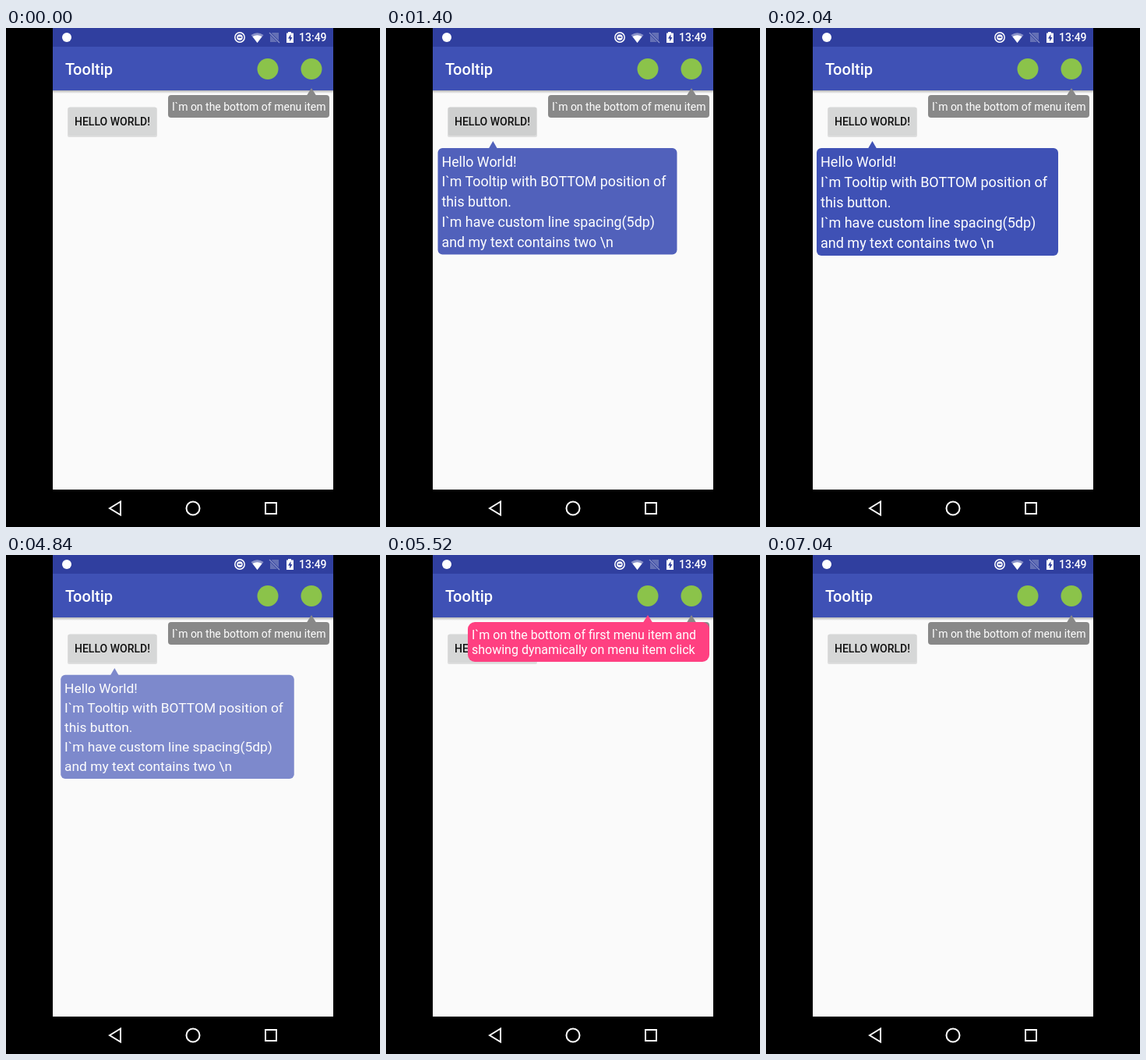
An HTML page that plays this animation: 480 by 640 pixels, repeating every 8 s.

```html
<!DOCTYPE html>
<html lang="en">
<head>
<meta charset="utf-8">
<title>Tooltip</title>
<style>
  html, body { margin: 0; width: 100%; height: 100%; overflow: hidden; background: #000; }
  svg { display: block; width: 480px; height: 640px; font: 14px Roboto, sans-serif; fill: #fff; }
  .medium { font-weight: 500; }
  .line { fill: none; stroke: #fff; stroke-width: 2; }
  .indigo { fill: #3f51b5; }
  .gray { fill: #888; }
  .pink { fill: #ff4081; }
  .green { fill: #8bc34a; }
  #blue { font-size: 18px; }
  #red { font-size: 16px; }
</style>
</head>
<body>
<svg viewBox="0 0 480 640">
  <defs>
    <linearGradient id="shade" x2="0" y2="1">
      <stop stop-color="#888" stop-opacity=".6"/>
      <stop offset="1" stop-color="#888" stop-opacity="0"/>
    </linearGradient>
  </defs>

  <rect width="480" height="640" fill="#000"/>
  <rect x="60" width="360" height="592" fill="#fafafa"/>
  <rect x="60" y="80" width="360" height="4" fill="url(#shade)"/>
  <rect class="indigo" x="60" y="24" width="360" height="56"/>
  <rect x="60" width="360" height="24" fill="#303f9f"/>

  <!-- status bar -->
  <circle cx="78" cy="12" r="6"/>
  <circle cx="300" cy="12" r="6.2" fill="none" stroke="#fff" stroke-width="1.5"/>
  <circle cx="300" cy="12" r="3.8"/>
  <path d="M297.8 12h4.4" stroke="#303f9f" stroke-width="1.5"/>
  <path d="M314.5 9Q322.5 3.5 330.5 9L322.5 19Z" fill="#8a93c8"/>
  <path d="M316.5 11Q322.5 7.5 328.5 11L322.5 19Z"/>
  <path d="M341.5 6H350V18H339V9Z" fill="#6470b5"/>
  <path d="M338 6L351 19" stroke="#303f9f" stroke-width="3"/>
  <path d="M338 6L351 19" stroke="#8a93c8" stroke-width="1.3"/>
  <path d="M362 5h4v1.5h3V19h-9V6.5h2Z"/>
  <path d="M365.5 8L362 13.5h2.2V17.5L367.5 12h-2Z" fill="#303f9f"/>
  <text class="medium" x="376" y="17">13:49</text>

  <!-- app bar -->
  <text class="medium" x="76" y="60" font-size="20">Tooltip</text>
  <circle class="green" cx="336" cy="52.5" r="13.5"/>
  <circle class="green" cx="392" cy="52.5" r="13.5"/>

  <!-- button -->
  <rect x="79" y="102" width="115" height="38" rx="2" fill="#ccc" opacity=".6"/>
  <rect x="80" y="101.5" width="113" height="36.5" rx="2" fill="#d6d7d7"/>
  <rect id="press" x="80" y="101.5" width="113" height="36.5" rx="2" fill="#888"/>
  <text class="medium" x="88" y="125" fill="#111">HELLO WORLD!</text>

  <!-- tooltips -->
  <g>
    <path class="gray" d="M386 86.5L392 77L398 86.5Z"/>
    <rect class="gray" x="208" y="86" width="207" height="29" rx="4"/>
    <text x="213" y="106">I`m on the bottom of menu item</text>
  </g>
  <g id="blue">
    <path class="indigo" d="M131 154.5L136.5 145L142 154.5Z"/>
    <rect class="indigo" x="65" y="154" width="310" height="138" rx="6"/>
    <text x="70" y="178">Hello World!</text>
    <text x="70" y="204">I`m Tooltip with BOTTOM position of</text>
    <text x="70" y="230">this button.</text>
    <text x="70" y="256">I`m have custom line spacing(5dp)</text>
    <text x="70" y="282">and my text contains two \n</text>
  </g>
  <g id="red">
    <path class="pink" d="M330 86.5L336 77L342 86.5Z"/>
    <rect class="pink" x="105" y="86" width="310" height="51" rx="9"/>
    <text x="110" y="108">I`m on the bottom of first menu item and</text>
    <text x="110" y="127">showing dynamically on menu item click</text>
  </g>

  <!-- navigation bar -->
  <path class="line" d="M133 616L147 607.5V624.5Z"/>
  <circle class="line" cx="240" cy="616" r="8.5"/>
  <rect class="line" x="333" y="609" width="14" height="14"/>
</svg>
<script>
  const LOOP = 8000, FADE = 220;
  const el = id => document.getElementById(id);
  const ramp = (t, start, length) => Math.min(1, Math.max(0, (t - start) / length));
  const easeOut = x => 1 - (1 - x) ** 2;

  // Fades and scales a popup about the middle of its top edge.
  function popup(id, t, show, hide, x, y) {
    const p = easeOut(ramp(t, show, FADE)) - easeOut(ramp(t, hide, FADE));
    const scale = 0.9 + 0.1 * p;
    el(id).setAttribute('transform',
      `translate(${x} ${y}) scale(${scale}) translate(${-x} ${-y})`);
    el(id).setAttribute('opacity', p);
  }

  function draw(now) {
    const t = now % LOOP;
    popup('blue', t, 1250, 4800, 220, 145);
    popup('red', t, 4968, 6800, 260, 77);
    el('press').setAttribute('opacity', 0.1 * (ramp(t, 1100, 120) - ramp(t, 1400, 500)));
    requestAnimationFrame(draw);
  }
  requestAnimationFrame(draw);
</script>
</body>
</html>
```
